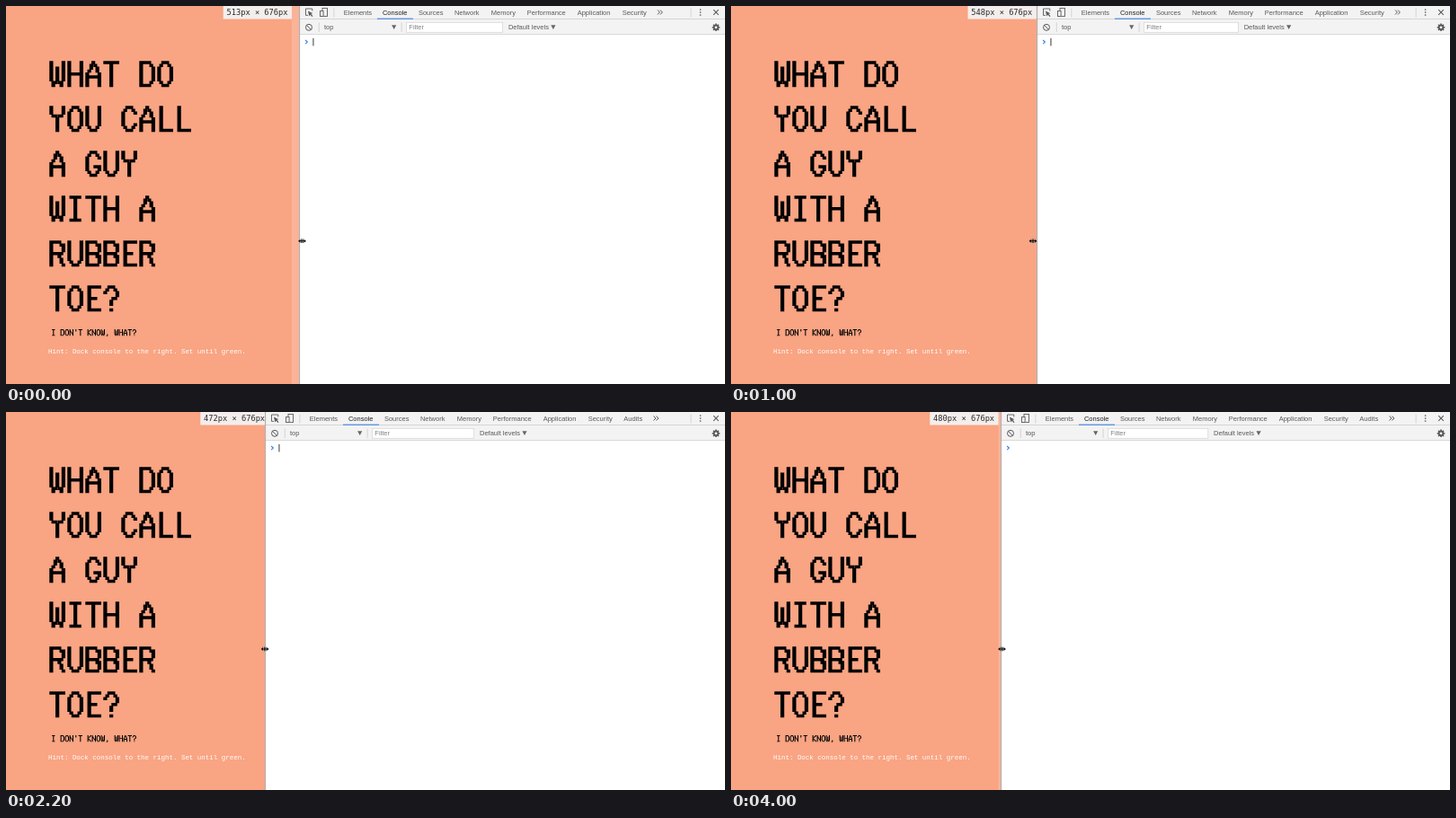
Write an HTML page with a canvas that moves like this. It is 800 by 421 pixels and loops after 4100 ms.

```html
<!DOCTYPE html>
<html lang="en">
<head>
<meta charset="utf-8">
<title>Dock the console</title>
<style>
html, body { margin: 0; width: 100%; height: 100%; overflow: hidden; background: #fff; }
canvas { display: block; }
</style>
</head>
<body>
<canvas id="stage" width="800" height="421"></canvas>
<script>
const ctx = document.getElementById('stage').getContext('2d');
const LOOP = 4100, STEP = 100, PX = 0.62;
const ORANGE = '#f9a483', GREY = '#5a5a5a', SANS = '7.5px "Liberation Sans", Arial, sans-serif';

// Divider position over time: [ms, x]
const DRAG = [
  [-200, 318], [-100, 322], [0, 326.5], [100, 329.5], [400, 330.5], [600, 334.5],
  [700, 337.5], [800, 339.8], [1000, 340.5], [1100, 336], [1200, 331], [1300, 323.6],
  [1400, 311], [1500, 304], [1600, 296.5], [1800, 294], [2000, 292.6], [2200, 288.5],
  [2600, 287], [3000, 290], [3200, 293.9], [3400, 296.5], [3600, 296.5], [3800, 297.6],
  [4000, 300.5], [4100, 301.5]
];

// Letter strokes on a 7 x 9 grid, each point written as column and row
const STROKES = {
  A: '08-04-30-64-68 05-65', B: '00-08-48-67-65-44-04 44-63-61-40-00',
  C: '62-40-20-02-06-28-48-66', D: '00-08-48-66-62-40-00', E: '60-10-18-68 14-44',
  G: '62-40-20-02-06-28-48-66-65-45', H: '00-08 60-68 04-64', I: '10-50 30-38 18-58',
  K: '00-08 60-04-68', L: '10-18-68', N: '00-08 01-67 60-68',
  O: '02-20-40-62-66-48-28-06-02', R: '08-00-40-61-63-44-04 34-68', T: '00-60 30-38',
  U: '00-06-28-48-66-60', W: '00-05-18-36-58-65-60 32-36', Y: '00-02-34-62-60 34-38',
  '?': '02-20-40-62-63-35-36 38-38', "'": '30-32', ',': '37-38-29'
};

function dragX(t) {
  const k = DRAG.findIndex(p => p[0] >= t);
  if (k < 1) return DRAG[0][1];
  const [t0, x0] = DRAG[k - 1], [t1, x1] = DRAG[k];
  return x0 + (x1 - x0) * (t - t0) / (t1 - t0);
}

function rect(x, y, w, h, color) {
  ctx.fillStyle = color;
  ctx.fillRect(x, y, w, h);
}

function text(str, x, y, color, font = SANS) {
  ctx.font = font;
  ctx.fillStyle = color;
  ctx.fillText(str, x, y);
}

function line(color, width, ...paths) {
  ctx.strokeStyle = color;
  ctx.lineWidth = width;
  ctx.beginPath();
  for (const p of paths) {
    ctx.moveTo(p[0], p[1]);
    for (let i = 2; i < p.length; i += 2) ctx.lineTo(p[i], p[i + 1]);
  }
  ctx.stroke();
}

function shape(color, ...p) {
  ctx.fillStyle = color;
  ctx.beginPath();
  for (let i = 0; i < p.length; i += 2) ctx.lineTo(p[i], p[i + 1]);
  ctx.fill();
}

function circle(x, y, r, color, width) {
  ctx.beginPath();
  ctx.arc(x, y, r, 0, Math.PI * 2);
  if (width) {
    ctx.strokeStyle = color;
    ctx.lineWidth = width;
    ctx.stroke();
  } else {
    ctx.fillStyle = color;
    ctx.fill();
  }
}

// Walks every stroke in whole grid steps so diagonals turn into stairs
function glyphPath(char) {
  const path = new Path2D();
  for (const stroke of STROKES[char].split(' ')) {
    const pts = stroke.split('-').map(p => [+p[0], +p[1]]);
    for (let i = 1; i < pts.length; i++) {
      const [x0, y0] = pts[i - 1], dx = pts[i][0] - x0, dy = pts[i][1] - y0;
      const n = Math.max(Math.abs(dx), Math.abs(dy), 1);
      for (let k = 0; k <= n; k++) {
        const col = Math.round(x0 + dx * k / n), row = Math.round(y0 + dy * k / n);
        path.rect(col * 2.25, row * 3.2, 4.2, 3.5);
      }
    }
  }
  return path;
}

const glyphs = {};
for (const char in STROKES) glyphs[char] = glyphPath(char);

function pixelText(str, x, y, scale) {
  ctx.fillStyle = '#000';
  [...str].forEach((char, i) => {
    if (!glyphs[char]) return;
    ctx.save();
    ctx.translate(x + i * 20 * scale, y);
    ctx.scale(scale, scale);
    ctx.fill(glyphs[char]);
    ctx.restore();
  });
}

function drawPage(pageW, panelX, fastLeft) {
  const edge = fastLeft ? panelX - 3 : panelX;
  ctx.save();
  ctx.beginPath();
  ctx.rect(0, 0, edge, 421);
  ctx.clip();
  rect(0, 0, edge, 421, ORANGE);
  if (pageW < panelX) rect(pageW, 0, panelX - pageW, 421, '#fab398');

  ['WHAT DO', 'YOU CALL', 'A GUY', 'WITH A', 'RUBBER', 'TOE?']
    .forEach((row, i) => pixelText(row, 48.3, 61.2 + i * 50, 1));
  pixelText("I DON'T KNOW, WHAT?", 50.6, 360, 0.25);
  text('Hint: Dock console to the right. Set until green.', 47, 386.7, '#fff',
    '7.48px "Liberation Mono", monospace');

  rect(pageW - 76.3, 0, 76.3, 14.5, '#f3eeec');
  text(`${Math.round(pageW / PX)}px × 676px`, pageW - 72.5, 10.2, '#2b2b2b',
    '8.7px "DejaVu Sans Mono", monospace');
  ctx.restore();
}

function drawTabs(x) {
  const tabs = [['Elements', 49.3], ['Console', 92.4], ['Sources', 132.4], ['Network', 172.4],
    ['Memory', 213.3], ['Performance', 253.3], ['Application', 309.2], ['Security', 359.2]];
  const wide = x < 315;
  if (wide) tabs.push(['Audits', 398.8]);
  for (const [name, dx] of tabs) text(name, x + dx, 9.6, name === 'Console' ? '#222' : GREY);
  rect(x + 86.5, 13.6, 40, 1.2, '#4a88e0');

  const m = x + (wide ? 432 : 398.5);
  line(GREY, 1, [m, 4.5, m + 2.4, 7, m, 9.5], [m + 3, 4.5, m + 5.4, 7, m + 3, 9.5]);

  // Inspect and device icons
  line(GREY, 0.9, [x + 9.5, 10.4, x + 7, 10.4, x + 7, 3, x + 14.3, 3, x + 14.3, 5.5]);
  shape(GREY, x + 9.5, 5.4, x + 15, 8.2, x + 12.8, 8.8, x + 15, 11.3, x + 14, 12, x + 12, 9.7, x + 10.8, 11.4);
  ctx.strokeRect(x + 25.5, 2.4, 5.5, 9);
  rect(x + 22.5, 5.4, 4.5, 6.4, '#f3f3f3');
  ctx.strokeRect(x + 23, 5.6, 3.6, 5.9);
  rect(x + 38, 2.5, 0.8, 10, '#ccc');

  rect(761.7, 2.5, 0.8, 10, '#ccc');
  for (const y of [4, 7, 10]) circle(772.6, y, 0.85, GREY);
  line(GREY, 1.1, [787.2, 4.2, 792.8, 9.8], [792.8, 4.2, 787.2, 9.8]);
}

function triangle(x, y) {
  shape('#666', x - 2.6, y - 2.2, x + 2.6, y - 2.2, x, y + 2.6);
}

function drawFilterBar(x) {
  circle(x + 10.5, 23.8, 3.5, GREY, 1);
  line(GREY, 1, [x + 8, 21.3, x + 13, 26.3]);
  rect(x + 21.3, 18.5, 0.8, 10.5, '#ccc');
  text('top', x + 27.5, 26.3, GREY);
  triangle(x + 105.2, 23.5);
  rect(x + 113.2, 18.5, 0.8, 10.5, '#ccc');

  // The filter field takes a share of the panel width
  const fieldW = 108 - (x - 326.5) * 0.16, levelsX = x + 124.4 + fieldW;
  rect(x + 118.5, 18, fieldW, 11.6, '#d2d2d2');
  rect(x + 119.2, 18.7, fieldW - 1.4, 10.2, '#fff');
  text('Filter', x + 121.8, 26.3, '#808080');
  text('Default levels', levelsX, 26.3, GREY);
  triangle(levelsX + 50, 23.5);

  for (let i = 0; i < 4; i++) {
    const a = i * Math.PI / 4, c = Math.cos(a) * 4.3, s = Math.sin(a) * 4.3;
    line(GREY, 1.7, [790 - c, 23.8 - s, 790 + c, 23.8 + s]);
  }
  circle(790, 23.8, 3.2, GREY);
  circle(790, 23.8, 1.4, '#f3f3f3');
}

function drawPanel(x, t) {
  rect(x, 0, 800 - x, 421, '#fff');
  rect(x, 0, 800 - x, 31, '#f3f3f3');
  rect(x, 14, 800 - x, 0.8, '#cfcfcf');
  rect(x, 31, 800 - x, 0.8, '#d0d0d0');
  drawTabs(x);
  drawFilterBar(x);
  rect(x - 0.3, 0, 0.9, 421, '#a0a0a0');
  line('#367cf1', 1.1, [x + 6.6, 38, x + 8.9, 40.1, x + 6.6, 42.2]);
  if ((t + 150) % 1100 < 560) rect(x + 15, 35.8, 0.9, 8.6, '#222');
}

function drawPointer(x, y) {
  const bars = [[x - 3, y, x + 3, y], [x - 0.8, y - 2.3, x - 0.8, y + 2.3], [x + 0.8, y - 2.3, x + 0.8, y + 2.3]];
  line('rgba(255,255,255,.6)', 1.8, ...bars);
  line('#000', 0.9, ...bars);
  for (const d of [-1, 1]) shape('#000', x + d * 4.3, y, x + d * 2.2, y - 2, x + d * 2.2, y + 2);
}

function draw(now) {
  const t = Math.floor((now % LOOP) / STEP) * STEP;
  const panelX = dragX(t);
  rect(0, 0, 800, 421, '#fff');
  drawPage(dragX(t - 200), panelX, panelX - dragX(t - 100) < -4);
  drawPanel(panelX, t);
  drawPointer(dragX(t + 100), t < 1200 ? 261.7 : 264);
}

const start = performance.now();
function tick() {
  draw(performance.now() - start);
  requestAnimationFrame(tick);
}
tick();
</script>
</body>
</html>
```
